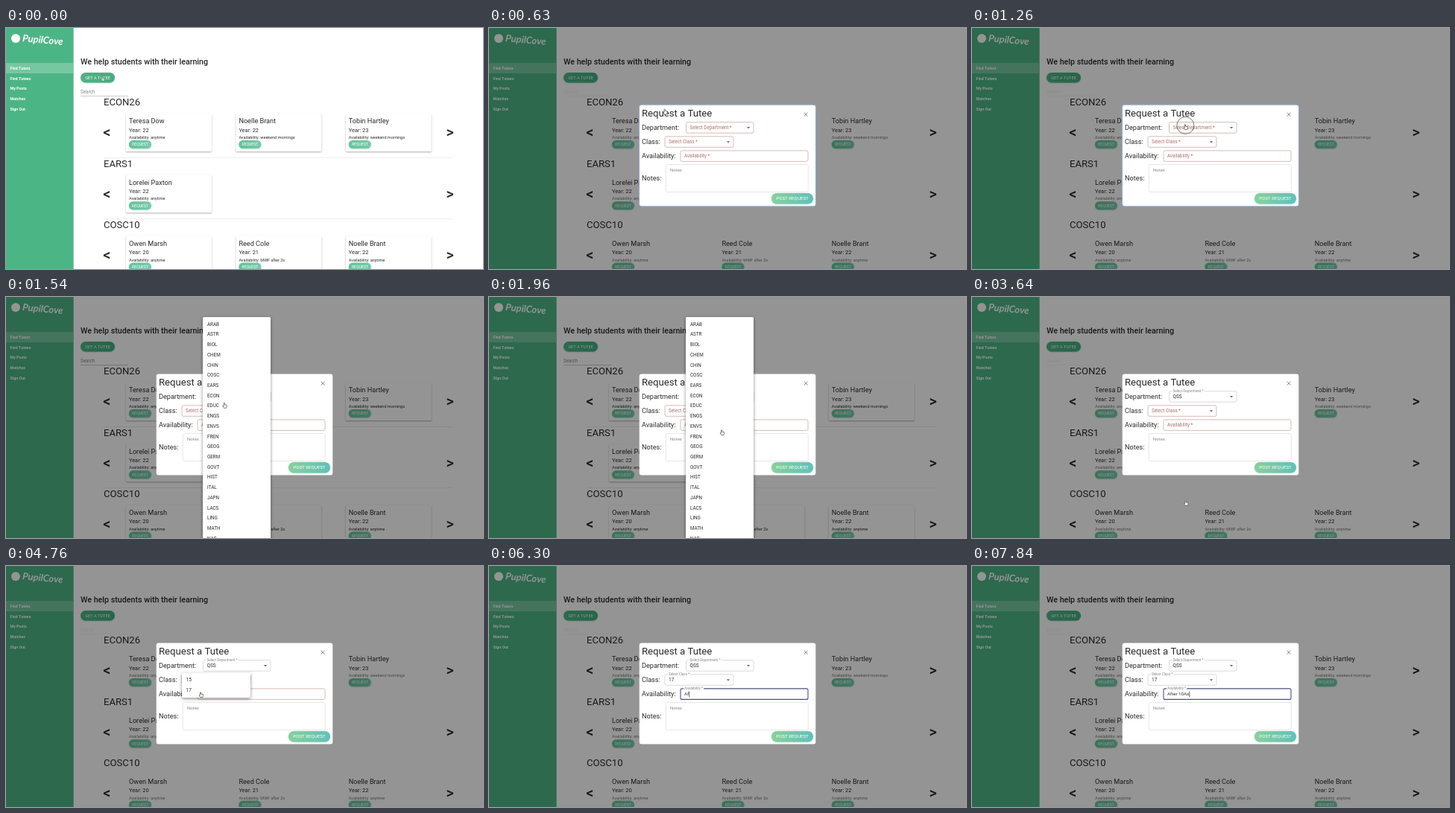
Animation of 640 by 324 pixels, one loop 8 s. Source, as an HTML page with a canvas:

```html
<!DOCTYPE html>
<html lang="en">
<head>
<meta charset="utf-8">
<title>Request a Tutee</title>
<style>
html, body { margin: 0; width: 100%; height: 100%; overflow: hidden; background: #fff; }
canvas { display: block; width: 640px; height: 324px; }
</style>
</head>
<body>
<canvas id="stage"></canvas>
<script>
const LOOP = 8000, STEP = 70;
const canvas = document.getElementById('stage');
const ctx = canvas.getContext('2d');
const dpr = window.devicePixelRatio || 1;
canvas.width = 640 * dpr;
canvas.height = 324 * dpr;

const GREEN = '#4cb585', INK = '#2a2a2a', GREY = '#888', RED = '#ad7068';
const NAV = ['Find Tutors', 'Find Tutees', 'My Posts', 'Matches', 'Sign Out'];
const COURSES = [
  ['ECON26', [['Teresa Dow', 22, 'anytime'], ['Noelle Brant', 22, 'weekend mornings'], ['Tobin Hartley', 23, 'weekend mornings']]],
  ['EARS1', [['Lorelei Paxton', 22, 'anytime']]],
  ['COSC10', [['Owen Marsh', 20, 'anytime'], ['Reed Cole', 21, 'MWF after 2s'], ['Noelle Brant', 22, 'anytime']]]
];
const DEPTS = ('ARAB ASTR BIOL CHEM CHIN COSC EARS ECON EDUC ENGS ENVS FREN GEOG GERM GOVT ' +
  'HIST ITAL JAPN LACS LING MATH NAS PHIL PORT PSYC QSS RUSS SOCY SPAN THEA').split(' ');

// [time, text in the availability field]
const TYPED = [[0, ''], [6160, 'A'], [6230, 'Af'], [6370, 'Aft'], [6650, 'After'], [6720, 'After '],
  [6930, 'After 1'], [7070, 'After 10'], [7280, 'After 10A'], [7700, 'After 10As']];
// [time, x, y] of the pointer
const PATH = [[0, 130, 68], [280, 130, 68], [840, 286, 133], [1400, 287, 133], [1820, 313, 182],
  [2590, 313, 182], [3080, 286, 291], [3500, 286, 291], [4200, 300, 155], [4550, 296, 155],
  [4760, 262, 173], [5040, 262, 173], [5250, 290, 173]];
const CLICKS = [0, 1190, 3220, 4480, 4900, 5250];

const clamp = v => Math.min(1, Math.max(0, v));
const ease = v => v * v * (3 - 2 * v);
const ramp = (t, a, b) => ease(clamp((t - a) / (b - a)));
const between = (t, a, b) => t >= a && t < b;
const mix = (a, b, k) => a + (b - a) * k;

function text(str, x, y, size, color = INK, weight = 400, align = 'left') {
  ctx.font = `${weight} ${size}px Roboto, sans-serif`;
  ctx.textAlign = align;
  ctx.textBaseline = 'alphabetic';
  ctx.fillStyle = color;
  ctx.fillText(str, x, y + size * 0.355);
}

function rect(x, y, w, h, color) {
  ctx.fillStyle = color;
  ctx.fillRect(x, y, w, h);
}

function round(x, y, w, h, r) {
  ctx.beginPath();
  ctx.roundRect(x, y, w, h, r);
}

function shadowed(blur, dy, color, draw) {
  ctx.save();
  ctx.shadowColor = color;
  ctx.shadowBlur = blur * dpr;
  ctx.shadowOffsetY = dy * dpr;
  draw();
  ctx.restore();
}

function faded(alpha, draw) {
  if (alpha <= 0) return;
  ctx.save();
  ctx.globalAlpha *= alpha;
  draw();
  ctx.restore();
}

function pill(label, x, y, w, h, size, from, to) {
  const fill = ctx.createLinearGradient(x, 0, x + w, 0);
  fill.addColorStop(0, from);
  fill.addColorStop(1, to);
  ctx.fillStyle = fill;
  shadowed(2, 0.5, 'rgba(60,170,130,.45)', () => {
    round(x, y, w, h, h / 2);
    ctx.fill();
  });
  text(label, x + w / 2, y + h / 2, size, '#fff', 400, 'center');
}

function sidebar() {
  rect(0, 0, 90, 324, GREEN);
  rect(90, 0, 1, 324, '#93cfb4');
  rect(0, 47, 90, 14, 'rgba(255,255,255,.24)');
  NAV.forEach((item, i) => text(item, 5.5, 54 + i * 13.7, 5.3, '#fff', 700));
  ctx.fillStyle = '#fff';
  ctx.beginPath();
  ctx.arc(13, 14, 6, 0, 7);
  ctx.fill();
  ctx.save();
  ctx.translate(22, 14);
  ctx.rotate(0.09);
  ctx.font = 'italic 700 13px Lato, sans-serif';
  ctx.textAlign = 'left';
  ctx.fillText('PupilCove', 0, 4);
  ctx.restore();
}

function card([name, year, when], x, y, detail) {
  faded(detail, () => shadowed(2, 1, 'rgba(0,0,0,.32)', () => {
    ctx.fillStyle = '#fff';
    round(x, y, 115, 51, 1.5);
    ctx.fill();
  }));
  text(name, x + 4, y + 10.1, 9.15);
  text('Year: ' + year, x + 4, y + 22.2, 7.4);
  faded(mix(0.65, 1, detail), () => text('Availability: ' + when, x + 4, y + 32.2, 5.5));
  pill('REQUEST', x + 4, y + 36, 30, 11, 5.1, '#65c398', '#78caae');
}

function page(detail) {
  rect(0, 0, 640, 324, '#fff');
  sidebar();
  text('We help students with their learning', 100, 44.8, 10.7, INK, 500);
  pill('GET A TUTEE', 100, 60, 46, 13.5, 5.65, GREEN, '#45ad7f');
  faded(mix(0.15, 1, detail), () => {
    text('Search', 100, 85.7, 6.3, GREY);
    rect(100, 91.3, 64, 0.6, '#aaa');
  });
  COURSES.forEach(([code, people], row) => {
    const y = 100 + row * 82.3;
    text(code, 131, y - 0.2, 13.1);
    text('<', 135.3, y + 40.3, 20, INK, 500, 'center');
    text('>', 595.7, y + 40.3, 20, INK, 500, 'center');
    people.forEach((p, i) => card(p, 161 + i * 147.4, y + 15, detail));
    faded(detail, () => rect(131, y + 74, 469, 0.6, '#e4e4e4'));
  });
}

function field(x, y, w, h, color, width = 0.7) {
  ctx.strokeStyle = color;
  ctx.lineWidth = width;
  round(x, y, w, h, 2);
  ctx.stroke();
}

// Outlined input whose label floats up into the border as k goes from 0 to 1.
function input(label, x, y, w, k, focused) {
  const tone = focused ? '#4a5280' : k > 0.5 ? '#ccc' : '#c49f9a';
  field(x, y, w, 14.5, tone, focused ? 1.1 : 0.7);
  const size = mix(6.3, 4.6, k);
  if (k > 0.5) {
    ctx.font = `400 ${size}px Roboto, sans-serif`;
    rect(x + 4, y - 1, ctx.measureText(label).width + 2, 2, '#fff');
  }
  text(label, x + 5, mix(y + 7, y - 0.3, k), size, k > 0.5 ? GREY : RED);
}

function chevron(x, y) {
  ctx.fillStyle = '#666';
  ctx.beginPath();
  ctx.moveTo(x - 2.2, y - 1);
  ctx.lineTo(x + 2.2, y - 1);
  ctx.lineTo(x, y + 1.3);
  ctx.fill();
}

function typing(t) {
  const value = TYPED.filter(([at]) => at <= t).pop()[1];
  text(value, 262, 172.1, 6.2);
  if (between(t, 5390, 5810) || t >= 6090) {
    const end = 262 + ctx.measureText(value).width;
    rect(end + 0.2, 168.5, 0.7, 7.5, INK);
  }
}

function modal(t) {
  ctx.fillStyle = '#fff';
  round(201.7, 103.5, 236.6, 136, 3);
  ctx.fill();
  if (t < 1400) {
    ctx.strokeStyle = '#8fa9c9';
    ctx.lineWidth = 1;
    round(201.3, 103, 237.4, 137, 3.5);
    ctx.stroke();
  }
  text('Request a Tutee', 205, 114.7, 13.15);
  text('Department:', 205, 133.8, 9.1);
  text('Class:', 205, 153, 9.1);
  text('Availability:', 205, 172, 9.1);
  text('Notes:', 205, 201.8, 9.1);

  ctx.strokeStyle = '#666';
  ctx.lineWidth = 0.8;
  ctx.beginPath();
  for (const s of [-1, 1]) {
    ctx.moveTo(422.7, 116.2 - 2.4 * s);
    ctx.lineTo(427.5, 116.2 + 2.4 * s);
  }
  ctx.stroke();

  input('Select Department *', 264.5, 126.7, 90.5, ramp(t, 3430, 3570));
  chevron(348, 134);
  if (t >= 3430) text('QSS', 269.5, 133.9, 6.5);

  input('Select Class *', 236, 145.8, 92, ramp(t, 4900, 5040));
  chevron(321, 153.3);
  if (t >= 4900) text('17', 241, 153.1, 6.5);

  input('Availability *', 257, 164.9, 171, ramp(t, 5320, 5530), t >= 5320);
  typing(t);

  field(237.3, 183.5, 191, 37, '#ddd');
  text('Notes', 243, 191, 6, GREY);
  pill('POST REQUEST', 379, 222, 56, 14.5, 6.2, '#88d19a', '#62c0ba');
}

function paper(x, y, w, h) {
  shadowed(4, 1.5, 'rgba(0,0,0,.45)', () => {
    ctx.fillStyle = '#fff';
    round(x, y, w, h, 1.5);
    ctx.fill();
  });
}

function deptMenu(t) {
  const scroll = 91.4 * ramp(t, 2660, 3150);
  paper(264, 27, 91, 310);
  ctx.save();
  ctx.beginPath();
  ctx.rect(264, 27, 91, 297);
  ctx.clip();
  DEPTS.forEach((d, i) => text(d, 270, 36.4 + i * 13.72 - scroll, 6.3));
  ctx.restore();
}

function classMenu() {
  paper(236, 143.5, 92, 33.5);
  text('15', 241.5, 153.1, 6.5);
  text('17', 241.5, 166.8, 6.5);
}

function pointerAt(t) {
  const i = PATH.findIndex(([at]) => at > t);
  if (i < 0) return PATH[PATH.length - 1].slice(1);
  const [t0, x0, y0] = PATH[i - 1], [t1, x1, y1] = PATH[i];
  const k = ramp(t, t0, t1);
  return [mix(x0, x1, k), mix(y0, y1, k)];
}

function hand(x, y) {
  ctx.save();
  ctx.translate(x, y);
  ctx.lineJoin = 'round';
  ctx.beginPath();
  ctx.moveTo(-1.6, 0.8);
  ctx.lineTo(-1.6, -3);
  ctx.quadraticCurveTo(-0.9, -4, -0.3, -3);
  ctx.lineTo(-0.3, -0.9);
  ctx.lineTo(2.3, -0.4);
  ctx.lineTo(2.6, 1.4);
  ctx.lineTo(1.8, 3.6);
  ctx.lineTo(-1.2, 3.6);
  ctx.lineTo(-3, 0.9);
  ctx.closePath();
  ctx.fillStyle = '#fff';
  ctx.fill();
  ctx.strokeStyle = '#444';
  ctx.lineWidth = 0.7;
  ctx.stroke();
  ctx.restore();
}

function pointer(t) {
  if (t >= 5390) return;
  const [x, y] = pointerAt(t);
  for (const at of CLICKS) {
    if (!between(t, at, at + 210)) continue;
    const r = mix(4, 11.5, clamp((t - at) / 70));
    ctx.beginPath();
    ctx.arc(x - 0.5, y - 2, r, 0, 7);
    ctx.fillStyle = `rgba(130,130,130,${t > at ? 0.06 : 0.2})`;
    ctx.fill();
    if (t > at) {
      ctx.strokeStyle = 'rgba(80,80,80,.75)';
      ctx.lineWidth = 1;
      ctx.stroke();
    }
  }
  faded(t < 280 ? 0.5 : 1, () => hand(x, y));
}

function render(t) {
  ctx.setTransform(dpr, 0, 0, dpr, 0, 0);
  const shade = ramp(t, 140, 420);
  const dept = ramp(t, 1400, 1540) * (1 - ramp(t, 3430, 3640));
  const classes = ramp(t, 4550, 4690) * (1 - ramp(t, 4900, 5110));
  page(Math.max(1 - shade, dept));
  rect(0, 0, 640, 324, `rgba(0,0,0,${0.42 * shade})`);
  faded(shade, () => {
    ctx.translate(0, -22 * (1 - shade));
    modal(t);
  });
  faded(dept, () => deptMenu(t));
  faded(classes, classMenu);
  pointer(t);
}

function tick() {
  const t = performance.now() % LOOP;
  render(Math.min(Math.floor(t / STEP) * STEP, 7840));
  requestAnimationFrame(tick);
}
tick();
</script>
</body>
</html>
```
